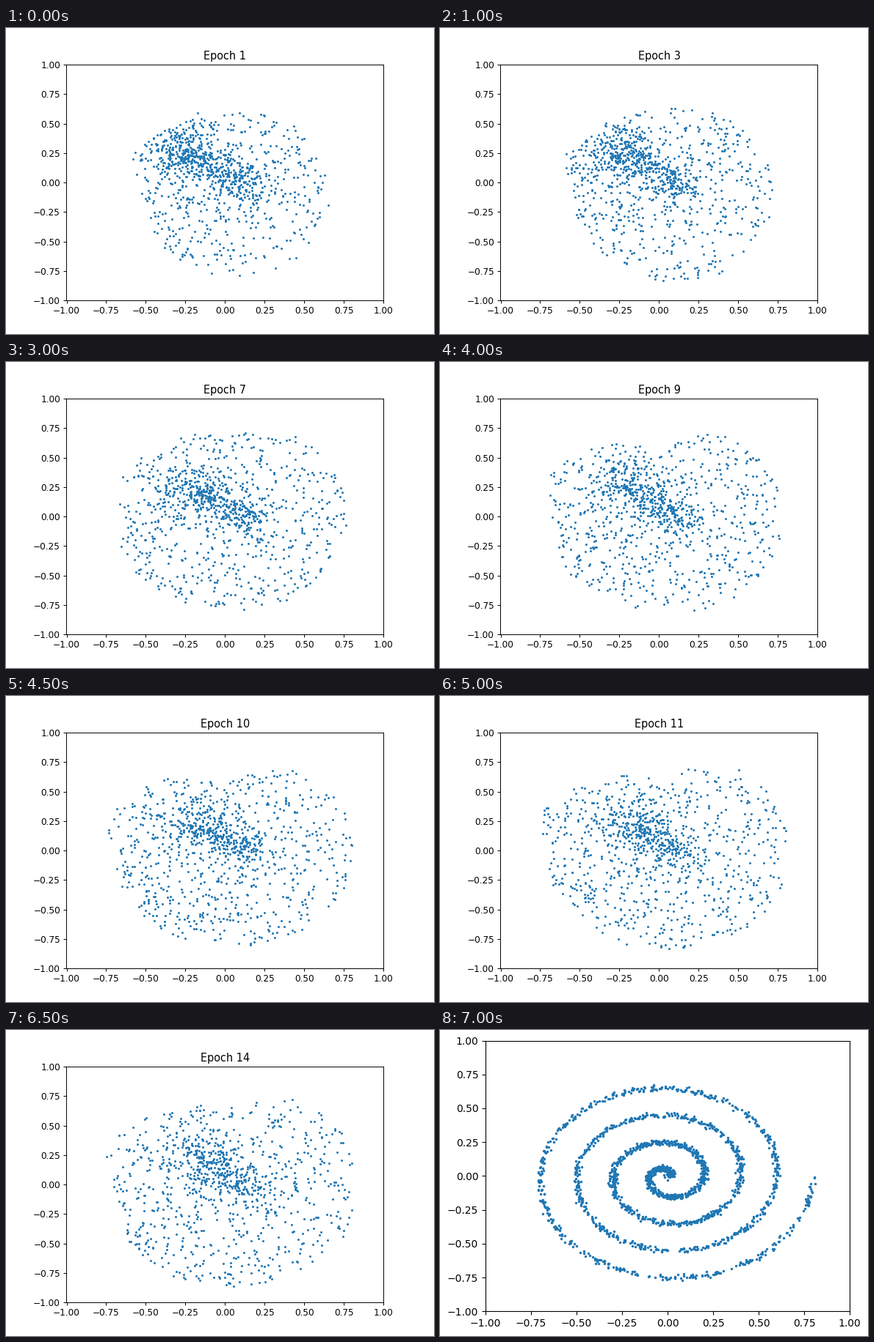
Animation of 583x418 px, one loop 7.5 s. Source, as a matplotlib script:

```python
import numpy as np
import matplotlib.pyplot as plt
from matplotlib.animation import FuncAnimation

W, H, DPI = 583, 418, 64
FULL = 100 / DPI            # point scale of a 100 dpi plot
SMALL = FULL * H / 480      # the same plot shrunk to the stage height
EPOCHS = 14
POINTS = 1000
BLUE = "#1f77b4"

# Outline radius of the cloud every 30 degrees, keyed by step
KEYS = [0, 2, 4, 6, 9, 11]
OUTLINE = np.array([
    [.66, .63, .72, .63, .62, .66, .53, .54, .66, .75, .78, .68],
    [.73, .71, .75, .67, .63, .67, .54, .58, .66, .78, .82, .74],
    [.76, .77, .83, .68, .72, .72, .58, .62, .70, .82, .84, .76],
    [.77, .80, .87, .73, .82, .76, .64, .72, .72, .74, .80, .72],
    [.80, .85, .88, .60, .76, .82, .70, .71, .75, .76, .80, .80],
    [.79, .88, .92, .70, .79, .85, .70, .73, .79, .82, .82, .86],
])
CENTER = np.array([0, -.05])


def panel(left, top, width, height, s):
    """Axes placed in pixels, with default styling scaled by s."""
    ax = fig.add_axes([left / W, 1 - (top + height) / H, width / W, height / H])
    ticks = np.linspace(-1, 1, 9)
    ax.set(xlim=(-1, 1), ylim=(-1, 1), xticks=ticks, yticks=ticks)
    ax.tick_params(length=3.5 * s, width=.8 * s, pad=3.5 * s, labelsize=10 * s)
    for spine in ax.spines.values():
        spine.set_linewidth(.8 * s)
    dots = ax.scatter([], [], s=s * s, c=BLUE, linewidths=1.5 * s)
    return ax, dots


def cloud(step):
    rng = np.random.default_rng(40 + step)
    t = min(step / 11, 1)
    n_clump = int(POINTS * (.25 - .14 * t))
    n_ridge = int(POINTS * (.22 - .02 * t))
    n_base = POINTS - n_clump - n_ridge

    radii = [np.interp(step, KEYS, col) for col in OUTLINE.T]
    angle = rng.uniform(0, 360, n_base)
    edge = np.interp(angle, np.arange(0, 360, 30), radii, period=360)
    r = edge * rng.random(n_base) ** .52
    a = np.radians(angle)
    base = CENTER + np.column_stack([r * np.cos(a), r * np.sin(a)])

    clump = rng.normal([-.26 + .06 * t, .25], .095 + .04 * t, (n_clump, 2))

    u = rng.random((n_ridge, 1))
    ridge = np.array([-.14, .2]) + u * np.array([.34, -.26])
    ridge = ridge + rng.normal(0, .075, (n_ridge, 2))
    return np.vstack([base, clump, ridge])


def spiral(n=2000):
    rng = np.random.default_rng(7)
    t = rng.random(n)
    a = 8 * np.pi * t
    curve = .8 * t[:, None] * np.column_stack([np.cos(a), np.sin(a)])
    return curve + rng.normal(0, .01, (n, 2))


plt.rcParams["font.family"] = "DejaVu Sans"
fig = plt.figure(figsize=(W / DPI, H / DPI), dpi=DPI, facecolor="white")

k = H / 480
train_ax, train_dots = panel((W - 640 * k) / 2 + 80 * k, 57.6 * k,
                             496 * k, 369.6 * k, SMALL)
title = train_ax.set_title("", fontsize=12 * SMALL, pad=6 * SMALL)

data_ax, data_dots = panel(62, 14.6, 496, 369.6, FULL)
data_dots.set_offsets(spiral())


def update(step):
    training = step < EPOCHS
    train_ax.set_visible(training)
    data_ax.set_visible(not training)
    if training:
        title.set_text(f"Epoch {step + 1}")
        train_dots.set_offsets(cloud(step))
    return train_ax, data_ax


anim = FuncAnimation(fig, update, frames=EPOCHS + 1, init_func=lambda: update(0),
                     interval=500, repeat=True, repeat_delay=0, blit=False)
plt.show()
```
